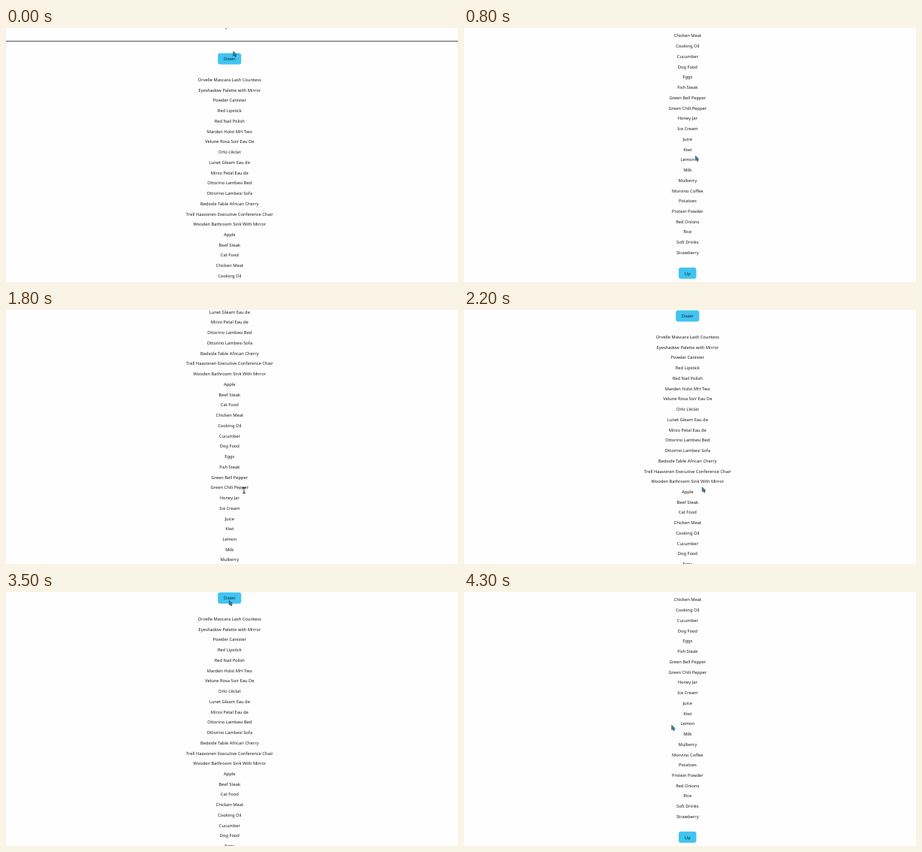
These frames come from a looping animation (600 by 338 pixels, 4400 ms). An HTML page:

```html
<!DOCTYPE html>
<html lang="en">
<head>
<meta charset="utf-8">
<title>Scrolling product list</title>
<style>
  html, body { margin: 0; width: 100%; height: 100%; overflow: hidden; background: #fefefe; }
  svg { display: block; width: 600px; height: 338px; }
  text {
    font: 5.76px "Noto Sans", "Open Sans", sans-serif;
    text-anchor: middle;
    text-rendering: geometricPrecision;
    fill: #1c1c1c;
  }
  .button rect { fill: #40c4f1; }
  .button text { fill: #0d2533; }
  #arrow { fill: #2b9bc8; stroke: #1d3340; stroke-width: .7; stroke-linejoin: round; }
  #beam { fill: none; stroke: #26323a; stroke-width: 1; }
</style>
</head>
<body>
<svg viewBox="0 0 600 338">
  <g id="page">
    <text x="292" y="-.3">g</text>
    <rect y="17" width="600" height="1" fill="#555"/>
    <g class="button">
      <rect x="281.2" y="33.5" width="31" height="15" rx="3"/>
      <text x="296.8" y="43.3">Down</text>
    </g>
    <g id="list"></g>
    <g class="button">
      <rect x="285" y="624.5" width="23.4" height="15" rx="3"/>
      <text x="296.8" y="634.4">Up</text>
    </g>
  </g>
  <g id="cursor">
    <path id="arrow" d="M.3 .3V6.3L1.7 5.1L2.8 7.4L3.9 6.9L2.8 4.7H4.6Z"/>
    <path id="beam" d="M-2 -3.6H2M0 -3.6V3.6M-2 3.6H2"/>
  </g>
</svg>
<script>
  const LOOP = 4400, STEP = 100;
  const ROW = 13.74, FIRST = 70.9, CENTER = 296.8;
  const TOP = 33, BOTTOM = 305.8;

  const items = [
    "Orvelle Mascara Lash Countess", "Eyeshadow Palette with Mirror", "Powder Canister",
    "Red Lipstick", "Red Nail Polish", "Marden Holst MH Two", "Velune Rosa Soir Eau De",
    "Orlo L'éclat", "Lunet Gleam Eau de", "Mirzo Petal Eau de", "Ottorino Lambesi Bed",
    "Ottorino Lambesi Sofa", "Bedside Table African Cherry",
    "Trell Haavonen Executive Conference Chair", "Wooden Bathroom Sink With Mirror",
    "Apple", "Beef Steak", "Cat Food", "Chicken Meat", "Cooking Oil", "Cucumber",
    "Dog Food", "Eggs", "Fish Steak", "Green Bell Pepper", "Green Chili Pepper",
    "Honey Jar", "Ice Cream", "Juice", "Kiwi", "Lemon", "Milk", "Mulberry",
    "Morvino Coffee", "Potatoes", "Protein Powder", "Red Onions", "Rice",
    "Soft Drinks", "Strawberry"
  ];

  // Smooth scrolls: start, duration, from, to
  const scrolls = [
    [279, 521, 0, BOTTOM],
    [1561, 492, BOTTOM, TOP],
    [3806, 492, TOP, BOTTOM]
  ];

  // Pointer path: time, x, y
  const path = [
    [0, 301.5, 31], [300, 301.5, 32], [500, 305, 50], [800, 307, 170],
    [1200, 309, 326], [1500, 306, 326], [1800, 316, 240], [2000, 316, 235.5],
    [2700, 316, 235.5], [3000, 307.5, 62], [3300, 298, 10], [3500, 296, 11],
    [3900, 296, 11], [4300, 275.5, 177]
  ];
  const overText = [[400, 600], [1700, 2000]];

  const $ = id => document.getElementById(id);
  const page = $("page"), cursor = $("cursor"), arrow = $("arrow"), beam = $("beam");

  items.forEach((name, i) => {
    const row = document.createElementNS("http://www.w3.org/2000/svg", "text");
    row.setAttribute("x", CENTER);
    row.setAttribute("y", FIRST + i * ROW);
    row.textContent = name;
    $("list").append(row);
  });

  // cubic-bezier(.42, 0, .58, 1)
  function easeInOut(x) {
    let lo = 0, hi = 1;
    for (let i = 0; i < 20; i++) {
      const u = (lo + hi) / 2, v = 1 - u;
      if (1.26 * u * v * v + 1.74 * u * u * v + u ** 3 < x) lo = u; else hi = u;
    }
    return lo * lo * (3 - 2 * lo);
  }

  function scrollAt(t) {
    let y = 0;
    for (const [start, length, from, to] of scrolls) {
      if (t < start) break;
      y = from + (to - from) * easeInOut(Math.min(1, (t - start) / length));
    }
    return y;
  }

  function pointerAt(t) {
    const next = path.findIndex(p => p[0] > t);
    if (next < 0) return path[path.length - 1].slice(1);
    const [t0, x0, y0] = path[next - 1], [t1, x1, y1] = path[next];
    const k = (t - t0) / (t1 - t0);
    return [x0 + (x1 - x0) * k, y0 + (y1 - y0) * k];
  }

  function draw(now) {
    const t = Math.floor((now % LOOP) / STEP) * STEP;
    const isBeam = overText.some(([a, b]) => t >= a && t < b);
    page.setAttribute("transform", `translate(0 ${-scrollAt(t)})`);
    cursor.setAttribute("transform", `translate(${pointerAt(t)})`);
    arrow.style.display = isBeam ? "none" : "";
    beam.style.display = isBeam ? "" : "none";
  }

  const begin = performance.now();
  function tick() {
    draw(performance.now() - begin);
    requestAnimationFrame(tick);
  }
  tick();
</script>
</body>
</html>
```
